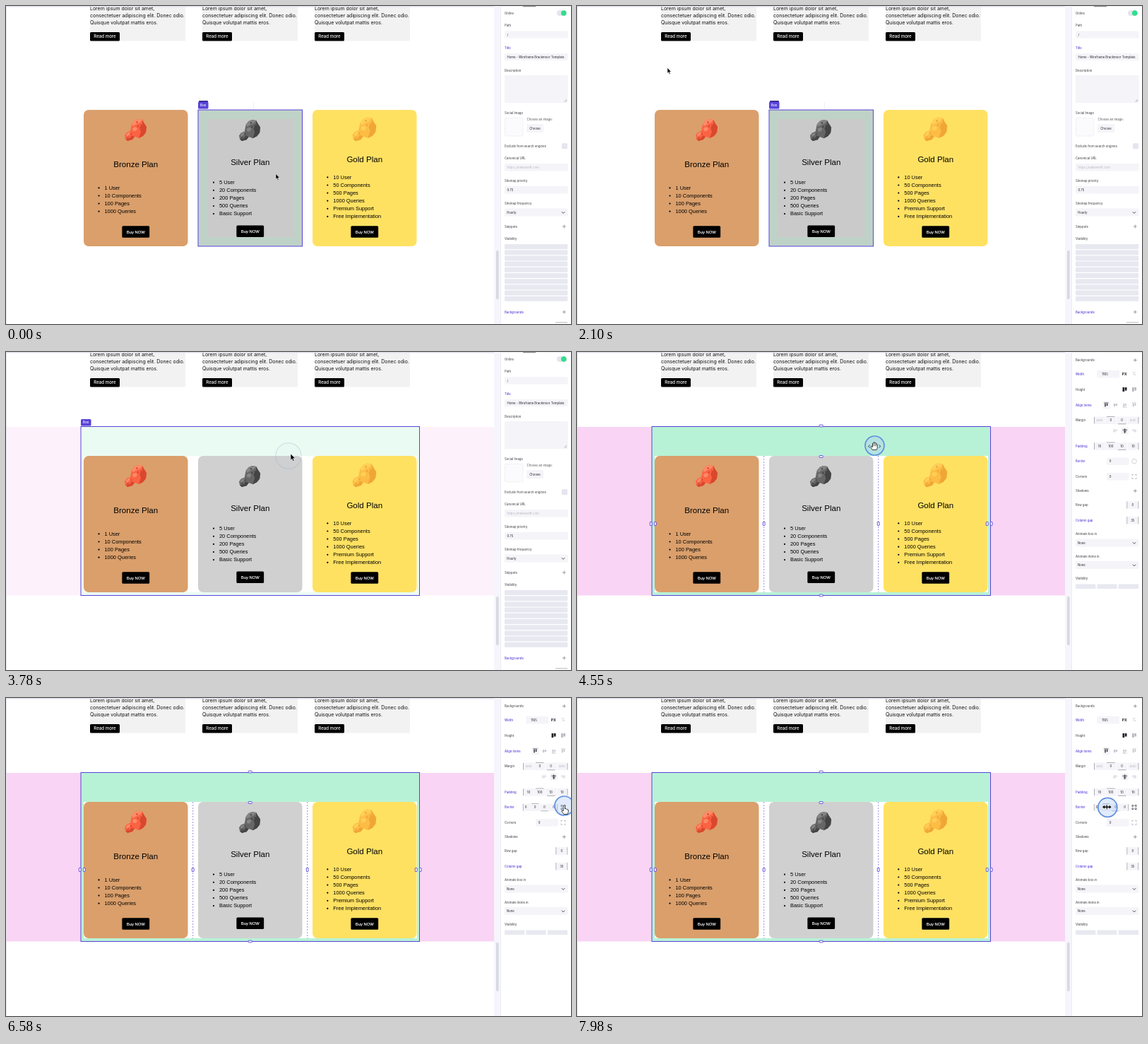
Animation of 800 by 450 pixels, one loop 8000 ms. Source, as an HTML page:

```html
<!DOCTYPE html>
<html lang="en">
<head>
<meta charset="utf-8">
<title>Plan cards editor</title>
<style>
  html, body { margin: 0; width: 100%; height: 100%; overflow: hidden; background: #fff; }
  svg { display: block; width: 800px; height: 450px; }
  text { font-family: Inter, Roboto, sans-serif; white-space: pre; }
  .card { font-family: "Liberation Sans", Arial, sans-serif; }
  .mid { text-anchor: middle; }
</style>
</head>
<body>
<svg id="stage" viewBox="0 0 800 450"></svg>
<script>
const PURPLE = '#5843d8', LABEL = '#55555c', DARK = '#222228', PALE = '#b9b9c2', FIELD = '#f4f4f9';

const rect = (x, y, w, h, fill, r = 0, extra = '') =>
  `<rect x="${x}" y="${y}" width="${w}" height="${h}" rx="${r}" fill="${fill}" ${extra}/>`;
const line = (d, color = DARK, w = .7, extra = '') =>
  `<path d="${d}" fill="none" stroke="${color}" stroke-width="${w}" ${extra}/>`;
// y is the middle of the letters
const text = (x, y, s, size, fill = '#000', extra = '') =>
  `<text x="${x}" y="${y + size * .36}" font-size="${size}" fill="${fill}" ${extra}>${s}</text>`;
const group = (id, body, extra = '') => `<g id="${id}" ${extra}>${body}</g>`;

/* ---------- page ---------- */
function article(x) {
  const copy = ['Lorem ipsum dolor sit amet,', 'consectetuer adipiscing elit. Donec odio.', 'Quisque volutpat mattis eros.'];
  return rect(x, 0, 135, 49.5, '#f2f2f2') +
    copy.map((s, i) => text(x, 3.6 + i * 9.9, s, 6.96, '#111')).join('') +
    rect(x, 37, 42, 12.5, '#000', 1.5) +
    text(x + 21, 43.2, 'Read more', 6.1, '#fff', 'class="mid" font-weight="500"');
}

function rock(x, y, scale, [light, main, dark]) {
  const poly = (d, fill) => `<path d="${d}" fill="${fill}"/>`;
  return `<g transform="translate(${x} ${y}) scale(${scale})">` +
    poly('M10 7 14 2 19 0 25 1 27 5 31 11 30 19 26 24 20 27 12 24 8 17Z', main) +
    poly('M25 1 27 5 31 11 30 19 26 24 20 27 23 18 21 12 25 8Z', dark) +
    poly('M14 2 19 0 25 1 22 5 17 7 12 10 10 7Z', light) +
    poly('M11 13 15 11 18 13 16 17 12 17Z', light) +
    poly('M16 4 18 3 19 5 17 6ZM22 8 24 7 25 10 23 11ZM18 9 20 9 20 11 18 12ZM25 14 27 13 28 16 25 18Z', dark) +
    poly('M0 23 3 19 8 17 13 20 14 25 11 29 4 31 1 28Z', main) +
    poly('M14 25 11 29 4 31 1 28 7 27 10 23Z', dark) +
    poly('M2 22 5 19 8 19 7 22 3 25Z', light) +
    poly('M8 20 10 20 10 22 8 22ZM4 25 6 25 5 27 3 27Z', dark) + '</g>';
}

function planCard(p) {
  const cx = p.x + 73.75;
  return rect(p.x, 147, 147.5, 193, p.fill, 7) + (p.over || '') +
    rock(p.rock[0], p.rock[1], p.rock[2], p.tones) +
    text(cx, p.titleY, p.name + ' Plan', 11.55, '#000', 'class="card mid"') +
    p.items.map((s, i) => {
      const y = p.listY + i * 11.1;
      return `<circle cx="${p.listX - 8}" cy="${y + .4}" r="1.1"/>` + text(p.listX, y, s, 7.42, '#000', 'class="card"');
    }).join('') +
    rect(cx - 19.4, p.buttonY, 38.8, 16.5, '#000', 1.5) +
    text(cx, p.buttonY + 8.3, 'Buy NOW', 5.8, '#fff', 'class="card mid" stroke="#fff" stroke-width=".15"');
}

const silverPadding = group('silverPad', rect(272, 147, 147.5, 193, '#bfd2c8') + rect(285, 160, 122, 167, '#cacaca'));
const plans = [
  { x: 110, name: 'Bronze', fill: '#da9f6b', rock: [168, 160, 1], tones: ['#ff8a68', '#fb6343', '#d9472f'],
    titleY: 224, listX: 139.5, listY: 257, buttonY: 311.3,
    items: ['1 User', '10 Components', '100 Pages', '1000 Queries'] },
  { x: 272, name: 'Silver', fill: '#d0d0d0', rock: [330, 161, .97], tones: ['#858585', '#666', '#444'], over: silverPadding,
    titleY: 221, listX: 302, listY: 249.3, buttonY: 310.5,
    items: ['5 User', '20 Components', '200 Pages', '500 Queries', 'Basic Support'] },
  { x: 434, name: 'Gold', fill: '#ffe162', rock: [490.5, 157.5, 1.09], tones: ['#ffcf58', '#fdbd45', '#f0a637'],
    titleY: 217, listX: 463.3, listY: 242, buttonY: 311.3,
    items: ['10 User', '50 Components', '500 Pages', '1000 Queries', 'Premium Support', 'Free Implementation'] }
];

const tag = (x, y, w, h) => rect(x, y, w, h, PURPLE, 1.5) +
  text(x + w / 2, y + h / 2, 'Box', 4.6, '#fff', 'class="mid" font-weight="500"');
const frame = (x, y, w, h) => rect(x, y, w, h, 'none', 0, `stroke="${PURPLE}"`);

const boxTint = rect(0, 106, 106, 238.5, '#f9d4f4') + rect(586, 106, 105, 238.5, '#f9d4f4') +
  rect(106, 106, 480, 238.5, '#b8f2d6') + rect(110, 147, 472, 193, '#fff');

const handle = (x, y, w, h) => rect(x - w / 2, y - h / 2, w, h, '#fff', .5, `stroke="${PURPLE}" stroke-width=".9"`);
const boxHandles = [264.7, 426.7].map(x => line(`M${x} 147V340`, PURPLE, .6, 'stroke-dasharray="2 2"')).join('') +
  [104.5, 148, 344.5].map(y => handle(345.7, y, 5, 2.8)).join('') +
  [104.7, 110.7, 264.7, 426.7, 580.7, 586.7].map(x => handle(x, 243, 2.8, 5)).join('');

/* ---------- side panel ---------- */
const label = (y, s, accent) => text(706, y, s, 4.25, accent ? PURPLE : LABEL, 'font-weight="500"');
const value = (x, y, s, color = DARK, extra = '') => text(x, y, s, 4.3, color, extra);
const centered = (x, y, s, color) => value(x, y, s, color, 'class="mid"');
const field = (y, h, x = 706, w = 89.5) => rect(x, y, w, h, FIELD, 1.2);
const plus = y => line(`M787.8 ${y}h5M790.3 ${y - 2.5}v5`, '#666', .6);
const select = (y, s) => field(y, 11) + value(709, y + 5.5, s) +
  line(`M786.8 ${y + 4.7}l2.2 2.2 2.2 -2.2`, DARK, .8);

const pagePanel =
  rect(732, 0, 18, 1.2, '#8a8a90') +
  label(10, 'Online') + rect(780, 6, 14, 8, '#e5e5ef', 4) + '<circle cx="789.7" cy="10" r="3.8" fill="#2fdf8a"/>' +
  label(27.5, 'Path') + field(35.5, 10) + value(709.5, 40.5, '/') +
  label(59, 'Title', true) + field(67, 10) + value(709.5, 72, 'Home - Wireframe Brackmoor Template') +
  label(91, 'Description') + field(98, 39) + line('M790.5 135.5l3.5 -3.5M792.5 135.5l1.5 -1.5', '#777', .5) +
  label(151, 'Social Image') + rect(706.5, 158.5, 25.5, 25.5, '#fbfbfd', 2, 'stroke="#d5d5df" stroke-width=".6" stroke-dasharray="1.5 1.5"') +
  value(737.5, 160.5, 'Choose an image:', LABEL) + field(167, 12, 737, 24) +
  centered(749, 173, 'Choose') +
  label(198, 'Exclude from search engines') + rect(787, 194.3, 8, 8, '#e5e5ef', 1.2) +
  label(215.3, 'Canonical URL') + field(223, 10.5) + value(709.5, 228.3, 'https://makeswift.com', PALE) +
  label(247.5, 'Sitemap priority') + field(255, 10.5) + value(709.5, 260.3, '0.75') +
  label(279.3, 'Sitemap frequency') + select(286.5, 'Hourly') +
  label(312, 'Snippets') + plus(312) +
  label(329, 'Visibility') +
  Array.from({ length: 10 }, (_, i) => rect(706, 337 + i * 8.2, 89.3, 7, '#e8e8f1', 1.3)).join('') +
  label(433, 'Backgrounds', true) + plus(433) + rect(778, 447.3, 17, 1, '#b5b5bb');

// four cells, each marked on its own side
function sides(y, values) {
  return field(y - 5, 10.5, 732, 63) +
    values.map((s, i) => centered(740 + i * 15.8, y, s, s === 'auto' ? PALE : DARK)).join('') +
    line(`M732.5 ${y - 4.5}v9.5M750 ${y - 5}h11.5M766 ${y + 5.3}h11.5M795 ${y - 4.5}v9.5`, '#9a9aa6', .8) +
    line(`M748 ${y - 4}v8.5M763.7 ${y - 4}v8.5M779.5 ${y - 4}v8.5`, '#fff', .8);
}
const gapField = (y, s) => field(y - 5, 10.5, 778.5, 16.5) + centered(786.8, y, s) +
  line(`M778.8 ${y - 5}v10.5M794.8 ${y - 5}v10.5`, '#9a9aa6', .7);
const corners = (y, color) => line(`M786 ${y - 1.2}v-1.8h1.8m2.4 0h1.8v1.8m0 2.4v1.8h-1.8m-2.4 0h-1.8v-1.8`, color, .8);
const blocks = (x, y, color) => rect(x - 3, y - 3, 2.7, 6, color) + rect(x + .3, y - 3, 2.7, 4.5, color);
const alignIcon = (x, y, edge, color) => line(`M${x - 3} ${y + edge}h6`, color, .8) +
  rect(x - 2, y - 2, 1.4, 4.4, color) + rect(x + .6, y - 2, 1.4, 3, color);

const boxPanel =
  label(11.5, 'Backgrounds') + plus(11.5) +
  label(31.3, 'Width', true) + field(26, 10.5, 736.5, 31.5) + value(743, 31.3, '1165') +
  text(775.3, 31.3, 'PX', 5, DARK, 'class="mid" font-weight="700"') + text(789, 31.3, '%', 5.5, PALE, 'class="mid"') +
  label(53, 'Height') + blocks(775.5, 53, DARK) + blocks(789, 53, PALE) +
  label(75, 'Align items', true) + field(69.5, 11, 744.5, 10) + alignIcon(749.3, 75, -3, DARK) +
  alignIcon(762.5, 75, 0, PALE) + alignIcon(775.7, 75, 3, PALE) + alignIcon(789, 75, -3, PALE) +
  label(96.5, 'Margin') + sides(96.5, ['auto', '0', '0', 'auto']) +
  line('M759 110.5h6M759 112.7h4M786 110.5h6M788 112.7h4', PALE, .8) +
  field(106.5, 10, 770.5, 10.5) + line('M772.5 110.3h6.5M773.8 112.8h4M775.7 108.2v7', DARK, .9) +
  label(133, 'Padding', true) + sides(133, ['10', '100', '10', '10']) +
  label(154.5, 'Border', true) +
  group('borderOne', field(149.5, 10.5, 750, 31.5) + centered(755, 154.7, '0') +
    rect(786, 151.7, 6, 6, 'none', 2, 'stroke="#999" stroke-width=".7" stroke-dasharray="1.6 1"')) +
  group('borderFour', field(149.5, 10.5, 732, 49) +
    [736, 749, 762.3, 775.5].map(x => centered(x, 154.7, '0')).join('') +
    line('M732.3 150v9.5M744 149.5h10M757.5 159.8h10M780.8 150v9.5', '#9a9aa6', .7) +
    corners(154.7, DARK) + rect(786.8, 152.5, 4.4, 4.4, 'none', 1.5, 'stroke="#333" stroke-width=".5"')) +
  label(176.2, 'Corners') + field(171, 10.5, 750, 31.5) + centered(755, 176.2, '0') + corners(176.3, '#aaa') +
  label(196.5, 'Shadows') + plus(196.5) +
  label(216.2, 'Row gap') + gapField(216.2, '0') +
  label(238, 'Column gap', true) + gapField(238, '35') +
  label(257.3, 'Animate box in') + select(264.5, 'None') +
  label(289, 'Animate items in') + select(296, 'None') +
  label(320.8, 'Visibility') + [706, 736.3, 766.7].map(x => rect(x, 328.5, 28.4, 6.5, '#e8e8f1', 1)).join('');

/* ---------- pointers, drawn around their hot spot ---------- */
const shape = (d, fill, stroke, w = .8) => `<path d="${d}" fill="${fill}" stroke="${stroke}" stroke-width="${w}" stroke-linejoin="round"/>`;
const pointers = {
  arrow: shape('M0 -.5V7.2L1.7 5.6 2.9 8.4 4.2 7.8 3 5.1H5.4Z', '#000', '#fff', .5),
  hand: shape('M-3.2 6Q-5.6 2.6 -5.5 1.2T-3 2V-3Q-2.2 -4.4 -1.5 -3V-4.3Q-.6 -5.7 .3 -4.3V-3.6Q1.3 -4.9 2.1 -3.4V-2Q3.2 -3 3.8 -1.6V2.5Q3.6 4.5 2.6 6Z', '#fff', '#111') +
    line('M-1.5 -3V.8M.3 -3.6V.8M2.1 -2V1', '#111', .6) +
    line('M-7 -1L-8.8 1 -7 3M6.3 -1L8.1 1 6.3 3', '#222', .9),
  finger: shape('M-.8 -1.5Q.4 -2.8 1.5 -1.4V3Q2.5 2.2 3.2 3.2 4.3 2.6 4.9 3.8 6.2 3.5 6.2 5V7.5L5 10.5H-.2L-3 6.6Q-3.4 4.8 -1.8 5.2L-.8 6Z', '#fff', '#111'),
  resize: shape('M-6.6 0L-3 -3V-1H3V-3L6.6 0 3 3V1H-3V3Z', '#000', '#fff', .5) + line('M0 -3V3', '#000', 1)
};

const stage = document.getElementById('stage');
stage.innerHTML =
  rect(0, 0, 800, 450, '#fff') +
  [119, 278, 437].map(article).join('') +
  group('tint', boxTint) +
  plans.map(planCard).join('') +
  group('silverSel', rect(273, 134, 13, 4, '#2c2382', 1) + line('M350.5 136V147', '#e4e4ea', .6) +
    tag(272, 135.5, 14.5, 10) + frame(272, 147, 147.5, 193)) +
  group('boxFrame', frame(106, 105.5, 479.5, 239)) +
  group('boxTag', tag(106, 95, 14.5, 9.5)) +
  group('handles', boxHandles) +
  rect(0, 0, 691, 1.4, '#dedeea') + rect(0, 0, .8, 450, '#e2e2ea') +
  rect(691, 0, 10, 450, '#f6f5fb') + rect(694, 346, 3.6, 69, '#d8d8e1', 1.8) +
  rect(700.3, 0, 99.7, 450, '#fff') + rect(700.3, 0, .7, 450, '#e6e6ee') + rect(701, 0, 99, 1, '#ebebf2') +
  group('pagePanel', pagePanel) + group('boxPanel', boxPanel) +
  '<circle id="ring"/>' +
  group('pointer', Object.entries(pointers).map(([id, body]) => group(id, body)).join(''));

/* ---------- timeline ---------- */
const LOOP = 8000, SELECT = 3560, PANEL = 4380, SPLIT = 6520;
const path = [
  [0, 382, 238], [500, 382, 238], [1600, 128, 88], [2500, 128, 88], [3450, 403, 144.5], [3950, 403, 144.5],
  [4380, 421.5, 132.5], [4800, 421.5, 132.5], [5500, 749.5, 139], [5700, 749.5, 139],
  [6250, 790, 154], [6950, 790, 154], [7500, 750.3, 154.3], [LOOP, 750.3, 154.3]
];
const kinds = [[0, 'arrow'], [4380, 'hand'], [4850, 'arrow'], [6180, 'finger'], [7050, 'arrow'], [7350, 'resize']];
// press time, release time, centre
const clicks = [[3480, 3620, 400, 147], [4450, 4640, 421.5, 132.5], [6480, 6660, 790.5, 152.5], [7850, 8200, 751.3, 154.8]];

const el = id => document.getElementById(id);
const show = (id, on) => { el(id).style.display = on ? '' : 'none'; };
const clamp = v => Math.max(0, Math.min(1, v));
const ease = u => u * u * (3 - 2 * u);

function pointerAt(t) {
  const i = path.findIndex(k => k[0] > t), [t0, x0, y0] = path[i - 1], [t1, x1, y1] = path[i];
  const u = ease((t - t0) / (t1 - t0));
  return [x0 + (x1 - x0) * u, y0 + (y1 - y0) * u];
}

function drawRing(t) {
  const click = clicks.find(([down, up]) => t >= down && t < up + 240);
  show('ring', click);
  if (!click) return;
  const [down, up, x, y] = click, out = clamp((t - up) / 240);
  const attrs = {
    cx: x, cy: y, r: 13.5 + 7 * out, opacity: clamp((t - down) / 80) * (1 - out),
    fill: '#a9c5f5', 'fill-opacity': .35 * (1 - out),
    stroke: out ? '#8fa0bd' : '#5f8fdc', 'stroke-width': 1.7 - out
  };
  for (const key in attrs) el('ring').setAttribute(key, attrs[key]);
}

function draw(t) {
  const picked = t >= SELECT, open = t >= PANEL;
  show('silverSel', !picked);
  show('silverPad', !picked);
  show('boxFrame', picked);
  show('boxTag', picked && !open);
  show('handles', open);
  el('tint').style.opacity = ease(clamp((t - SELECT) / 630));
  show('pagePanel', !open);
  show('boxPanel', open);
  show('borderOne', t < SPLIT);
  show('borderFour', t >= SPLIT);

  const [x, y] = pointerAt(t), kind = kinds.filter(k => k[0] <= t).pop()[1];
  const scale = t > 3480 && t < 3900 ? 1.2 : 1;
  el('pointer').setAttribute('transform', `translate(${x} ${y}) scale(${scale})`);
  for (const id in pointers) show(id, id === kind);
  drawRing(t);
}

const start = performance.now();
function tick() {
  draw((performance.now() - start) % LOOP);
  requestAnimationFrame(tick);
}
tick();
</script>
</body>
</html>
```
